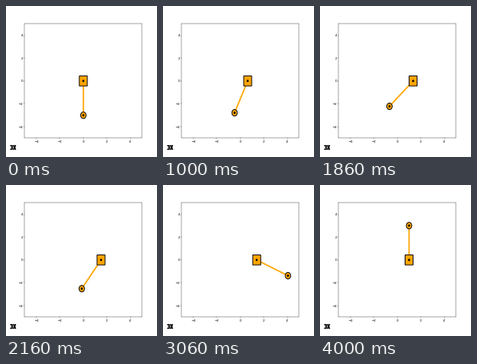
A matplotlib script that plays this animation: 189 px wide and 189 px high, repeating every 4020 ms.

```python
import numpy as np
import matplotlib.pyplot as plt
from matplotlib.animation import FuncAnimation
from matplotlib.lines import Line2D
from matplotlib.patches import Ellipse, Rectangle

SIZE, DPI = 189, 72          # at 72 dpi one point is one pixel
FRAMES, STEP = 201, 20
ROD = 3
ORANGE = "#ffa500"


def natural_spline(t, y):
    """Return a function for the natural cubic spline through (t, y)."""
    t, y = np.array(t), np.array(y)
    h = np.diff(t)
    slope = np.diff(y) / h
    a = np.eye(len(t))
    b = np.zeros(len(t))
    for i in range(1, len(t) - 1):
        a[i, i - 1:i + 2] = h[i - 1], 2 * (h[i - 1] + h[i]), h[i]
        b[i] = 6 * (slope[i] - slope[i - 1])
    m = np.linalg.solve(a, b)

    def value(s):
        i = min(max(np.searchsorted(t, s) - 1, 0), len(h) - 1)
        d = s - t[i]
        c1 = slope[i] - h[i] * (2 * m[i] + m[i + 1]) / 6
        return y[i] + d * (c1 + d * (m[i] / 2 + d * (m[i + 1] - m[i]) / (6 * h[i])))

    return value


# Swing-up: cart position and rod angle (0 hangs down, pi is upright)
times = [0, 0.52, 1.08, 1.52, 2.16, 2.68, 3.24, 3.42, 3.78, 4.0]
cart_x = natural_spline(
    times, [0, 0.24, 0.70, 1.09, 1.51, 1.57, 1.29, 1.20, 1.06, 1.0])
angle = natural_spline(
    times, [0, -0.023, -0.45, -0.72, -0.58, 0.16, 1.55, 1.96, 2.71, np.pi])

fig = plt.figure(figsize=(SIZE / DPI, SIZE / DPI), dpi=DPI, facecolor="white")
left, right, top, bottom = 23.4, 170.2, 22.2, 165.4
ax = fig.add_axes([left / SIZE, 1 - bottom / SIZE,
                   (right - left) / SIZE, (bottom - top) / SIZE])
ax.set(xlim=(-5, 5), ylim=(-5, 5),
       xticks=range(-4, 5, 2), yticks=range(-4, 5, 2))
ax.tick_params(length=1.3, width=0.4, pad=1.2, labelsize=3.9)
for spine in ax.spines.values():
    spine.set_linewidth(0.35)

ux = 10 / (right - left)     # data units per pixel
uy = 10 / (bottom - top)
CART_W, CART_H = 10 * ux, 12.5 * uy

rod, = ax.plot([], [], color=ORANGE, lw=1.7, snap=False, zorder=3)
style = dict(facecolor=ORANGE, edgecolor="black", lw=0.95, zorder=4)
cart = ax.add_patch(Rectangle((0, 0), CART_W, CART_H, snap=False, **style))
bob = ax.add_patch(Ellipse((0, 0), 6.8 * ux, 8.2 * uy, **style))
dots = [ax.add_patch(Ellipse((0, 0), 2.5 * ux, 2.9 * uy, color="black", lw=0, zorder=5))
        for _ in range(2)]


def stroke(xs, ys, width):
    """Draw a heavy pen stroke, in pixels from the top left."""
    fig.add_artist(Line2D(np.array(xs) / SIZE, 1 - np.array(ys) / SIZE,
                          color="black", lw=width, snap=False,
                          solid_capstyle="butt", solid_joinstyle="round"))


# Narrow heavy "3X" speed label
stroke([5.2, 7.9, 7.9, 5.2], [174.8, 174.8, 179.3, 179.3], 1.5)
stroke([6.3, 7.9], [177, 177], 1.2)
stroke([9.4, 12.0], [174.1, 180], 1.6)
stroke([12.0, 9.4], [174.1, 180], 1.6)


def draw(i):
    t = i * STEP / 1000
    x, a = cart_x(t), angle(t)
    bx, by = x + ROD * np.sin(a), -ROD * np.cos(a)
    rod.set_data([x, bx], [0, by])
    cart.set_xy((x - CART_W / 2, -CART_H / 2))
    bob.set_center((bx, by))
    dots[0].set_center((x, 0))
    dots[1].set_center((bx, by))
    return [rod, cart, bob, *dots]


anim = FuncAnimation(fig, draw, frames=FRAMES, interval=STEP,
                     repeat=True, repeat_delay=0, blit=False)
plt.show()
```
